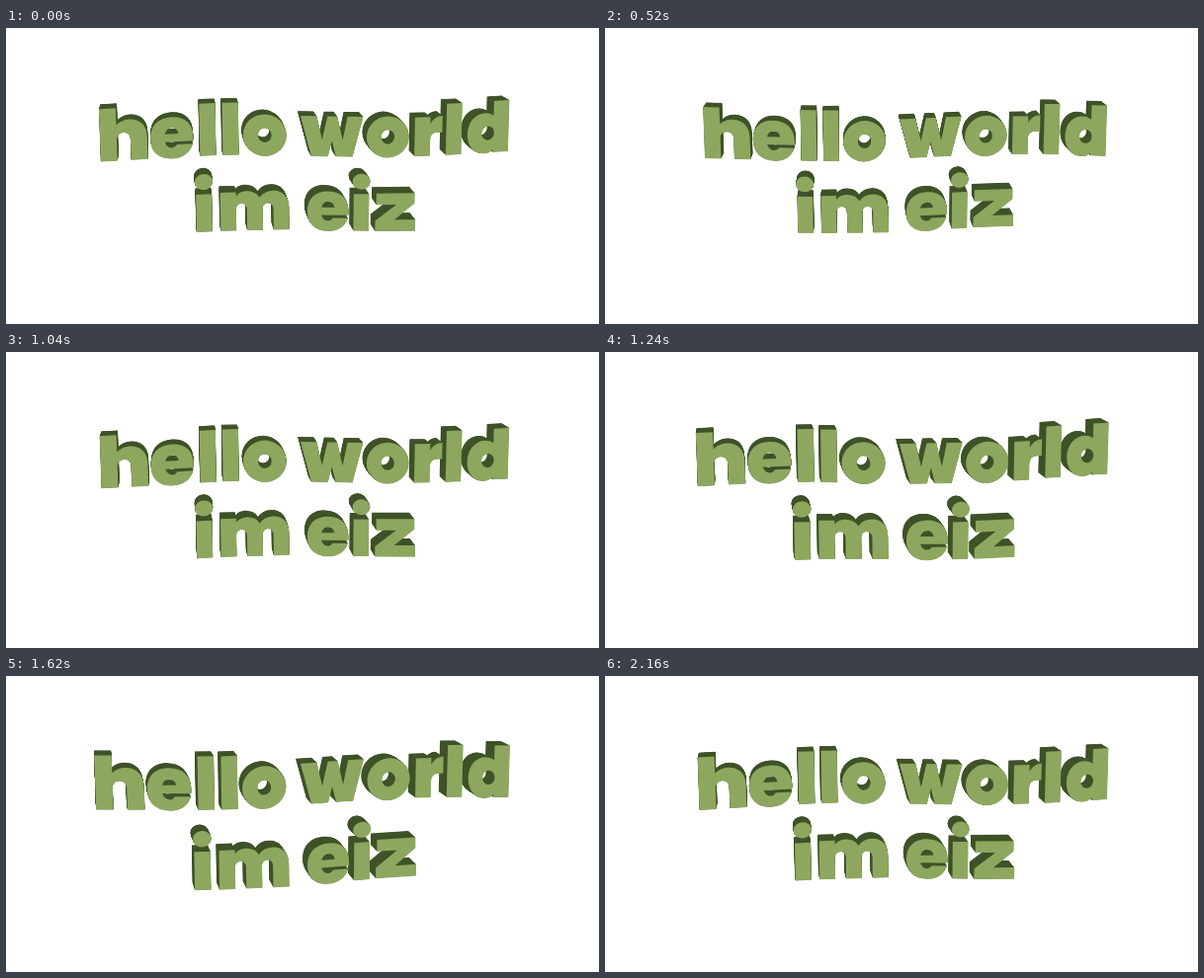
Recreate the animation shown at these times as an HTML page with a canvas. Size 600 px wide and 300 px high, loop 2180 ms.

```html
<!DOCTYPE html>
<html lang="en">
<meta charset="utf-8">
<title>hello world</title>
<style>
  html, body { margin: 0; width: 600px; height: 300px; overflow: hidden; background: #fff }
  canvas { display: block }
</style>
<canvas id="stage" width="600" height="300" aria-label="hello world, im eiz"></canvas>
<script>
const ctx = document.getElementById('stage').getContext('2d');
const LOOP = 2180, DIST = 1250, DEPTH = 29, LAYERS = 20;
const FRONT = '#8da75f', SIDE = '#3f5228';
const { sin, cos, PI } = Math;

// Glyph outlines, baseline at 0, with their widths
const glyphs = {
  h: [46.5, 'M0 0V-53H16.5V-36Q22-41 29.5-41C40-41 46.5-34 46.5-23V0H30V-21C30-25 27.5-28 23.3-28S16.5-25 16.5-21V0Z'],
  e: [42.6, 'M42.4-16H14.5C16-11 19-10 21.5-10Q24.5-10 26.5-13H42C39-4 32 1 21.5 1C8 1 0-7 0-20S8-41 21.5-41 42.6-33 42.6-20Q42.6-18 42.4-16ZM14.5-24H28Q27-30 21.5-30T14.5-24Z'],
  l: [16, 'M0 0V-53H16V0Z'],
  o: [43.6, 'M0-20a21.8 21.3 0 1 1 43.6 0a21.8 21.3 0 1 1-43.6 0ZM15-20a6.8 7.3 0 1 0 13.6 0a6.8 7.3 0 1 0-13.6 0Z'],
  w: [64, 'M0-41H16.5L22-17L27.5-41H37.5L43-17L48-41H64L53 0H36L32-16L28 0H11Z'],
  r: [28.5, 'M0 0V-40H16V-33Q20-41 28.5-41V-24H24Q16-24 16-16V0Z'],
  d: [43, 'M43 0V-53H27V-38Q23-41 18-41C8-41 0-33 0-20S8 1 18 1Q24 1 27-3V0ZM15-20a6.5 7.2 0 1 0 13 0a6.5 7.2 0 1 0-13 0Z'],
  i: [16, 'M0 0V-39H16V0ZM-1.2-52a9.2 8.3 0 1 1 18.4 0a9.2 8.3 0 1 1-18.4 0Z'],
  m: [70, 'M0 0V-40H16V-36Q20-41 27-41Q36-41 40-34Q45-41 54-41C64-41 70-34 70-23V0H54V-22C54-30 43-30 43-22V0H27V-22C27-30 16-30 16-22V0Z'],
  z: [43, 'M1 0V-11L23-28H2V-40H42V-29L21-12H43V0Z']
};
const lefts = [-201.2, -151.8, -103, -80.2, -59.7, -2, 65.2, 114.5, 147, 169, -107.8, -83.4, 5, 52.5, 74];

const letters = [];
[...'hello world\nim eiz'].forEach((char, index) => {
  if (!glyphs[char]) return;
  const [width, outline] = glyphs[char];
  letters.push({
    index, width, path: new Path2D(outline),
    left: lefts[letters.length], base: index < 11 ? -19.5 : 59.4
  });
});

function projector(swing) {
  const yaw = 0.107 - 0.061 * swing, pitch = 0.22;
  const zoom = 1 - 0.021 * swing;
  return (x, y, z) => {
    const x1 = x * cos(yaw) - z * sin(yaw);
    const z1 = x * sin(yaw) + z * cos(yaw);
    const y1 = y * cos(pitch) - z1 * sin(pitch);
    const scale = zoom * DIST / (DIST + z1 * cos(pitch) + y * sin(pitch));
    return [300 + x1 * scale, 150 + y1 * scale];
  };
}

function draw(now) {
  const angle = 2 * PI * (now % LOOP) / LOOP;
  const swing = sin(angle), project = projector(swing);
  ctx.setTransform(1, 0, 0, 1, 0, 0);
  ctx.fillStyle = '#fff';
  ctx.fillRect(0, 0, 600, 300);

  for (let layer = LAYERS; layer >= 0; layer--) {
    const z = DEPTH * layer / LAYERS;
    ctx.fillStyle = layer ? SIDE : FRONT;
    for (const { index, width, path, left, base } of letters) {
      // A wave runs leftwards through the letters and skews each along its slope
      const phase = 2 * angle + 0.628 * (index - 7.8);
      const slope = -0.04 * sin(phase);
      const y = base * (1 - 0.028 * swing) - 1.2 * cos(angle) + 2.7 * cos(phase);
      const place = (u, v) => project(left + u, y + (u - width / 2) * slope + v, z);
      const o = place(0, 0), a = place(width, 0), b = place(0, -50);
      ctx.setTransform(
        (a[0] - o[0]) / width, (a[1] - o[1]) / width,
        (o[0] - b[0]) / 50, (o[1] - b[1]) / 50, o[0], o[1]);
      ctx.fill(path, 'evenodd');
    }
  }
}

const start = performance.now();
function tick() {
  draw(performance.now() - start);
  requestAnimationFrame(tick);
}
tick();
</script>
</html>
```
